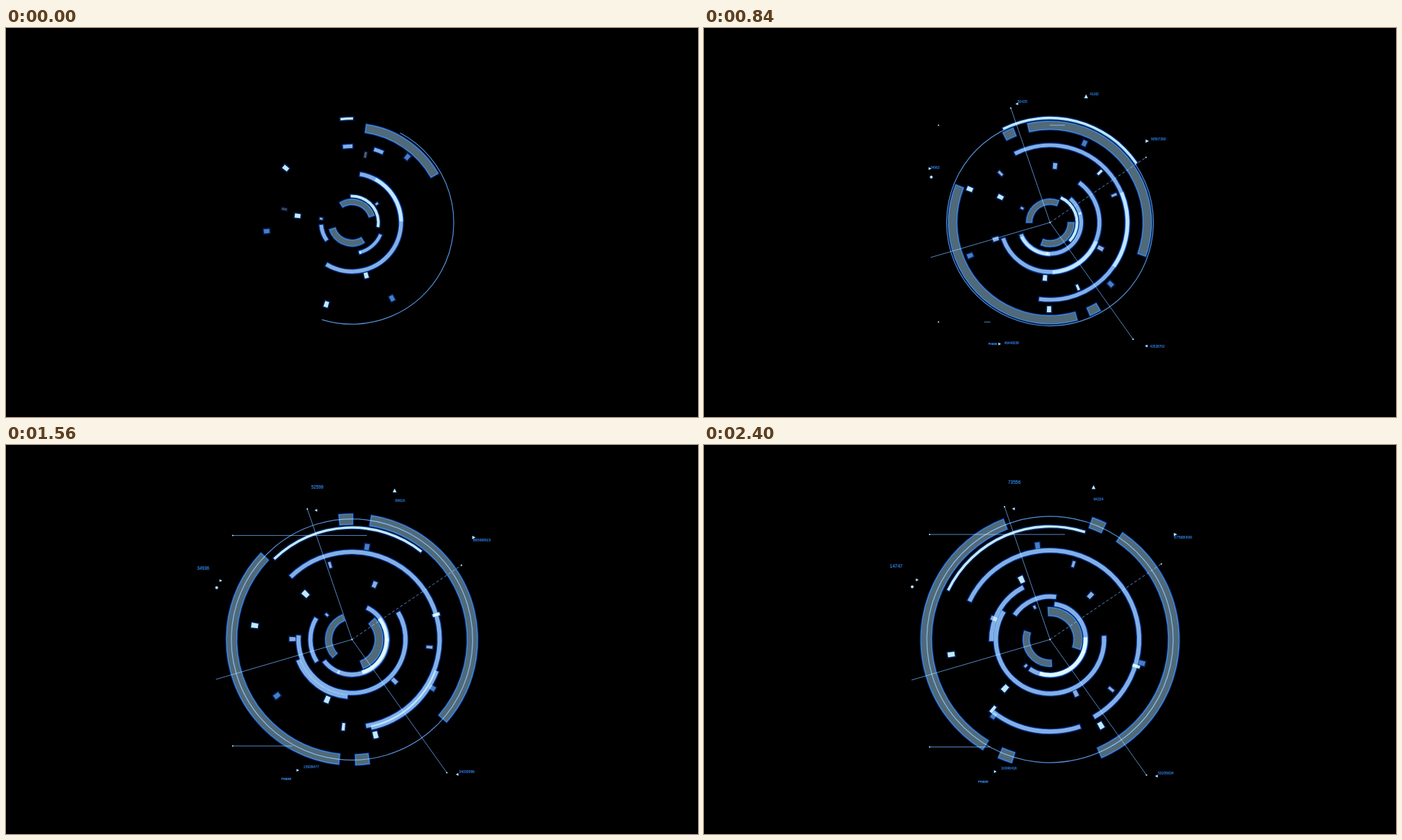
Recreate the animation shown at these times as an HTML page with a canvas. Size 997 by 561 pixels, loop 2.44 s.

```html
<!DOCTYPE html>
<html lang="en">
<head>
<meta charset="utf-8">
<title>Radial interface</title>
<style>
  html, body { margin: 0; width: 100%; height: 100%; overflow: hidden; background: #000; }
  canvas { display: block; }
</style>
</head>
<body>
<canvas id="stage" width="997" height="561"></canvas>
<script>
const ctx = document.getElementById('stage').getContext('2d');
const W = 997, H = 561, LOOP = 2440, STEP = 40;
const WHITE = 'rgb(190,234,255)', LIGHT = 'rgb(132,174,228)', BLUE = 'rgb(70,126,200)';
const LINE = 'rgb(84,134,196)', TEXT = 'rgb(66,144,240)';
const PLATE = { fill: 'rgb(80,106,122)', edge: 'rgb(16,84,190)' };
const BAND = { fill: LIGHT, edge: 'rgb(0,40,130)' };
const BRIGHT = { fill: WHITE };

const clamp = v => Math.max(0, Math.min(1, v));
const mix = (a, b, p) => a + (b - a) * p;
const rad = deg => deg * Math.PI / 180;
const smooth = v => { const u = clamp(v); return u * u * (3 - 2 * u); };

let t, expand, shapes;
const during = (from, to) => smooth((t - from) / (to - from));
// every layer starts at its depth and expands to full size
const zoom = depth => mix(depth, 1, expand);

function sector(r, w, depth, from, to, style, alpha = 1) {
  if (to <= from || alpha <= 0) return;
  const z = zoom(depth), path = new Path2D();
  path.arc(0, 0, (r + w / 2) * z, rad(from), rad(to));
  path.arc(0, 0, (r - w / 2) * z, rad(to), rad(from), true);
  path.closePath();
  shapes.push({ path, alpha, ...style });
}

// shown: degrees visible at the start; anchor: which end stays put while opening
function arc(style, { r, w, depth, from, sweep, rate, shown = 7, anchor = 0 }) {
  const open = mix(shown, sweep, during(0, 490));
  const a = from + rate * t / 1000 + (sweep - open) * anchor;
  sector(r, w, depth, a, a + open, style);
}

// a chain of small blocks, each 112 degrees behind the one before
function chain(fill, { r, w, depth, first, count, rate, sweep, dim }) {
  for (let i = 0; i < count; i++) {
    const a = first - 112 * i + rate * t / 1000;
    const shade = dim === undefined ? 1 : clamp((i === count - 1 ? dim : 0) + t / 400);
    sector(r, w, depth, a - sweep / 2, a + sweep / 2, { fill }, shade);
  }
}

function addPlates() {
  const outer = { r: 178.4, w: 15.5, depth: 0.768, rate: 30.1 };
  arc(PLATE, { ...outer, from: -128.1, sweep: 122.3, shown: 52, anchor: 0.66 });
  arc(PLATE, { ...outer, from: 49.1, sweep: 127.5, shown: 0 });
  for (const from of [35, 217]) arc(PLATE, { ...outer, from, sweep: 6.4, shown: 0 });
  const inner = { sweep: 112, rate: -60, shown: 104, anchor: 1 };
  arc(PLATE, { ...inner, r: 34.3, w: 9.3, depth: 0.866, from: -129.5 });
  arc(PLATE, { ...inner, r: 40.3, w: 12, depth: 0.737, from: 50.5 });
}

function addBands() {
  const w = 6;
  arc(BAND, { r: 128.5, w, depth: 0.856, from: -96.7, sweep: 215, rate: -24.1 });
  arc(BAND, { r: 132.8, w, depth: 0.83, from: -73.1, sweep: 57.2, rate: 60 });
  arc(BAND, { r: 78, w, depth: 0.906, from: -80.6, sweep: 215, rate: 32, shown: 202 });
  arc(BAND, { r: 84.5, w, depth: 0.84, from: -61.5, sweep: 64.5, rate: 100, shown: 60 });
  arc(BAND, { r: 51.5, w, depth: 0.864, from: -31.5, sweep: 207, rate: -21.3, shown: 31, anchor: 1 });
  arc(BAND, { r: 62, w, depth: 0.72, from: 23, sweep: 63, rate: 80, shown: 53 });
  arc(BRIGHT, { r: 163, w: 3.7, depth: 0.92, from: -96.4, sweep: 82.3, rate: -24.1 });
  arc(BRIGHT, { r: 51, w: 5.5, depth: 0.745, from: -100.5, sweep: 110.5, rate: 40.4, shown: 103, anchor: 1 });
}

function addBlocks() {
  chain(WHITE, { r: 144, w: 10, depth: 0.858, first: 219.4, count: 2, rate: -20, sweep: 2.8 });
  chain(BLUE, { r: 136.7, w: 9, depth: 0.904, first: 174.2, count: 3, rate: -19.9, sweep: 2.8 });
  chain(WHITE, { r: 95.7, w: 10, depth: 0.825, first: 187, count: 2, rate: 24, sweep: 4.3 });
  chain(LIGHT, { r: 51.6, w: 5, depth: 0.866, first: 187, count: 3, rate: 24, sweep: 3.8 });
  chain(LIGHT, { r: 86.3, w: 9, depth: 0.943, first: 6.9, count: 3, rate: 24, sweep: 4, dim: 0 });
  chain(WHITE, { r: 130, w: 11, depth: 0.765, first: 33.2, count: 2, rate: 40, sweep: 2, dim: 0.4 });
  chain(LIGHT, { r: 113.8, w: 9, depth: 0.873, first: 303.2, count: 2, rate: 40, sweep: 2, dim: 0.4 });
}

// halos first, then clear the insides, then blend the fills
function paintShapes() {
  ctx.strokeStyle = 'rgba(0,42,128,0.6)';
  ctx.lineWidth = 3.5;
  for (const s of shapes) {
    ctx.globalAlpha = s.alpha;
    ctx.stroke(s.path);
  }
  ctx.globalAlpha = 1;
  ctx.fillStyle = '#000';
  for (const s of shapes) ctx.fill(s.path);
  ctx.globalCompositeOperation = 'screen';
  ctx.lineWidth = 1.4;
  for (const s of shapes) {
    ctx.globalAlpha = s.alpha;
    ctx.fillStyle = s.fill;
    ctx.fill(s.path);
    if (!s.edge) continue;
    ctx.strokeStyle = s.edge;
    ctx.stroke(s.path);
  }
  ctx.globalAlpha = 1;
}

function paintRing() {
  ctx.beginPath();
  ctx.arc(0, 0, 177.5 * zoom(0.826), rad(-61.8), rad(-61.8 + mix(169, 360, during(0, 480))));
  ctx.strokeStyle = 'rgb(84,144,220)';
  ctx.lineWidth = 1.2;
  ctx.stroke();
}

function line(x0, y0, x1, y1, dash = []) {
  ctx.setLineDash(dash);
  ctx.beginPath();
  ctx.moveTo(x0, y0);
  ctx.lineTo(x1, y1);
  ctx.strokeStyle = LINE;
  ctx.lineWidth = 1;
  ctx.stroke();
  ctx.setLineDash([]);
}

function dot(x, y, r = 1.1) {
  ctx.beginPath();
  ctx.arc(x, y, r, 0, 7);
  ctx.fillStyle = WHITE;
  ctx.fill();
}

function spoke(x, y, start, { dash, tip = true } = {}) {
  if (t <= start) return;
  const z = zoom(0.85), p = during(start, start + 280) * z;
  line(0, 0, x * p, y * p, dash);
  if (tip) dot(x * z, y * z);
}

function rule(x, y, end) {
  if (t <= 760) return;
  const z = zoom(0.92);
  line(mix(end, x * z, during(760, 1130)), y * z, end, y * z);
  dot(x * z, y * z, 1);
}

function paintLines() {
  spoke(-65.5, -191.5, 180);
  spoke(-199.5, 58.5, 200, { tip: false });
  spoke(139, 195.5, 350);
  spoke(160.5, -109, 180, { dash: [4, 3] });
  if (t > 180) dot(0, 0);
  rule(-173.5, -151.5, 21.5);
  rule(-173.5, 155, -86);
}

function pointer(x, y, depth, turn, size = 2.1) {
  const z = zoom(depth);
  ctx.save();
  ctx.translate(x * z, y * z);
  ctx.rotate(rad(turn));
  ctx.beginPath();
  ctx.moveTo(size, 0);
  ctx.lineTo(-size * 0.8, -size * 0.9);
  ctx.lineTo(-size * 0.8, size * 0.9);
  ctx.fillStyle = WHITE;
  ctx.fill();
  ctx.restore();
}

function label(text, x, y, depth, size, weight = '') {
  const z = zoom(depth);
  ctx.font = `${weight} ${size * z}px "Liberation Sans", Arial, sans-serif`;
  ctx.fillStyle = TEXT;
  ctx.fillText(text, x * z, y * z);
}

function noise(seed) {
  const v = Math.sin(seed * 12.9898) * 43758.5453;
  return v - Math.floor(v);
}

// types itself in, then shows new random digits on every step
function counter(x, y, depth, size, count, start) {
  const typed = Math.min(count, Math.ceil((t - start) / 25));
  let text = '';
  for (let i = 0; i < typed; i++) text += Math.floor(noise(t / STEP + i * 7.3 + x) * 10);
  label(text, x, y, depth, size);
}

function paintLabels() {
  counter(-60.5, -226, 0.752, 6.5, 5, 340);
  counter(62.7, -202, 0.908, 5.2, 5, 470);
  counter(178.5, -146.7, 0.8, 5.9, 8, 260);
  counter(-230.7, -105.5, 0.727, 6.5, 5, 340);
  counter(-70.5, 186, 0.93, 5.1, 8, 400);
  counter(155.5, 193, 0.92, 5.1, 8, 505);
  if (t >= 340) {
    label('PHASE', -103.5, 205, 0.845, 4.3, 'bold');
    pointer(-52.5, -188.5, 0.9, 180);
    pointer(62.8, -219.5, 0.813, -90, 3);
    pointer(-191.5, -86, 0.896, 0);
    dot(-198.5 * zoom(0.85), -76 * zoom(0.85), 2);
  }
  if (t >= 600) {
    pointer(180.5, -151.5, 0.756, 0, 2.6);
    pointer(-79, 190.5, 0.913, 0);
    pointer(153.5, 197, 0.896, 180);
  }
}

function draw(time) {
  t = time;
  expand = during(640, 1810);
  shapes = [];
  addPlates();
  addBands();
  addBlocks();
  ctx.setTransform(1, 0, 0, 1, 0, 0);
  ctx.globalCompositeOperation = 'source-over';
  ctx.fillStyle = '#000';
  ctx.fillRect(0, 0, W, H);
  ctx.translate(W / 2, H / 2);
  paintShapes();
  paintRing();
  paintLines();
  ctx.shadowColor = 'rgb(0,50,150)';
  ctx.shadowBlur = 2;
  ctx.textBaseline = 'middle';
  paintLabels();
  ctx.shadowBlur = 0;
}

const begin = performance.now();
function tick() {
  const now = (performance.now() - begin) % LOOP;
  draw(Math.floor(now / STEP) * STEP);
  requestAnimationFrame(tick);
}
tick();
</script>
</body>
</html>
```
